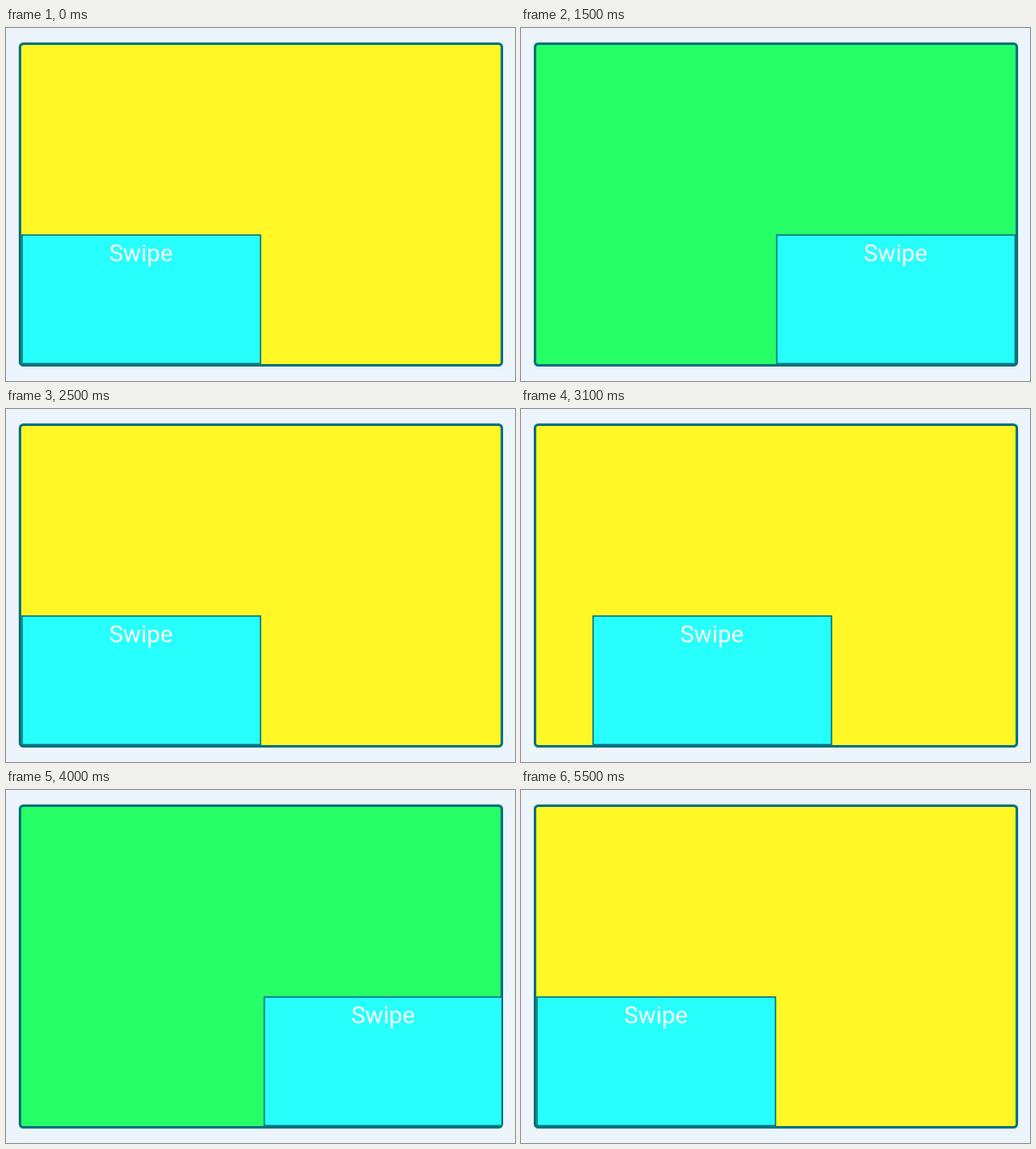
An HTML page for the animation above (5600 ms loop, 600 px wide and 416 px high).

```html
<!DOCTYPE html>
<html lang="en">
<head>
<meta charset="utf-8">
<style>
  html, body { margin: 0; width: 100%; height: 100%; overflow: hidden; background: #ecf4fc; }
  svg { display: block; width: 600px; height: 416px; }
  text { font: 28px Roboto, sans-serif; fill: #fff; text-anchor: middle; }
</style>
</head>
<body>
<svg viewBox="0 0 600 416">
  <clipPath id="inside"><rect x="17" y="19" width="567" height="378" rx="3"/></clipPath>
  <rect id="panel" x="16.5" y="18.5" width="568" height="379" rx="4"/>
  <rect x="16.5" y="18.5" width="568" height="379" rx="4" fill="none" stroke="#04737f" stroke-width="3"/>
  <g clip-path="url(#inside)">
    <g id="card">
      <rect x="0.5" y="244" width="281" height="151.5" fill="#26fffb" stroke="#087580" stroke-width="1.6"/>
      <text x="140.5" y="275">Swipe</text>
    </g>
  </g>
</svg>
<script>
const LOOP = 5600, STEP = 100;
const LEFT = 18.5, RIGHT = 301;
const YELLOW = '#fff726', GREEN = '#26ff66';

// Drag path of the card: [time, left edge]
const path = [
  [0, LEFT], [300, LEFT], [900, 308], [1000, 310.5], [1200, RIGHT],
  [1800, RIGHT], [2100, 167.5], [2400, LEFT],
  [2900, LEFT], [3100, 84.5], [3500, RIGHT],
  [3800, RIGHT], [4000, 304], [4400, 25], [4500, LEFT], [LOOP, LEFT]
];
// The panel is green while the card is settled on, or dragged from, the right
const greenSpans = [[1200, 2400], [3500, 4500]];

const panel = document.getElementById('panel');
const card = document.getElementById('card');
const smooth = p => p * p * (3 - 2 * p);

function cardX(t) {
  const i = path.findIndex(([time]) => time > t);
  const [t0, x0] = path[i - 1], [t1, x1] = path[i];
  return x0 + (x1 - x0) * smooth((t - t0) / (t1 - t0));
}

function draw() {
  const t = Math.floor(performance.now() % LOOP / STEP) * STEP;
  const green = greenSpans.some(([from, to]) => t >= from && t < to);
  panel.setAttribute('fill', green ? GREEN : YELLOW);
  card.setAttribute('transform', `translate(${cardX(t)} 0)`);
  requestAnimationFrame(draw);
}
draw();
</script>
</body>
</html>
```
